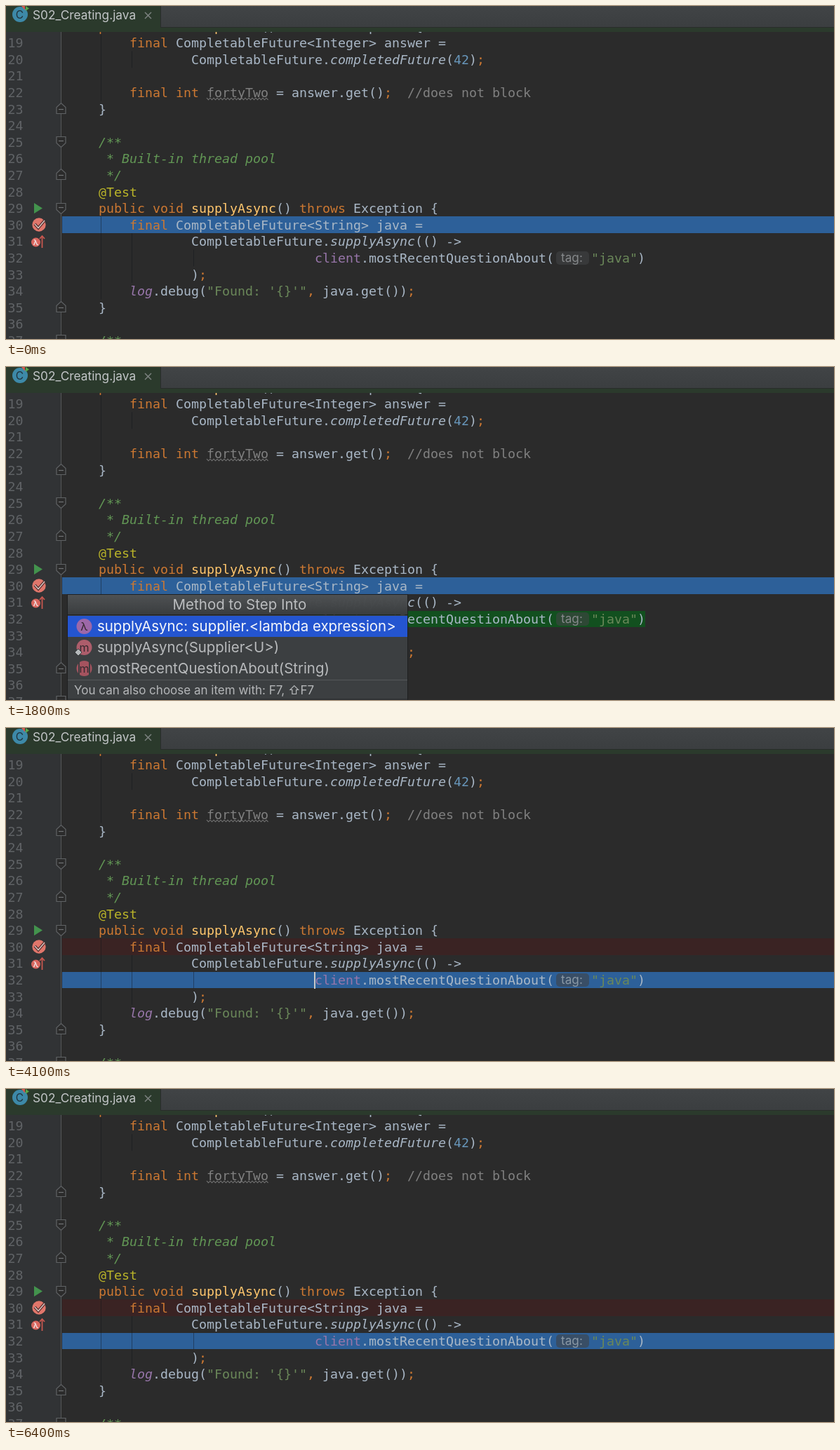
Write an HTML page with a canvas that moves like this. It is 1180x475 px and loops after 6500 ms.

```html
<!DOCTYPE html>
<html lang="en">
<head>
<meta charset="utf-8">
<title>Stepping into a lambda</title>
<style>
html, body { margin: 0; width: 100%; height: 100%; overflow: hidden; background: #2b2b2b; }
canvas { display: block; }
</style>
</head>
<body>
<canvas id="stage" width="1180" height="475"></canvas>
<script>
const ctx = document.getElementById('stage').getContext('2d');
const LOOP = 6500, CHAR = 11, ROW = 23.6, LEFT = 88;
const MONO = '"DejaVu Sans Mono", monospace', SANS = 'Inter, sans-serif';

const plain = '#a9b7c6', key = '#cc7832', method = '#ffc66d', field = '#9876aa',
  str = '#6a8759', doc = '#629755', num = '#6897bb', gray = '#808080', note = '#bbb529';

// row: [first column, ...[color, text, italic]]
const code = {
  18: [4, [key, 'public void '], [method, 'completed'], [plain, '() '], [key, 'throws '], [plain, 'Exception {']],
  19: [8, [key, 'final '], [plain, 'CompletableFuture<Integer> answer =']],
  20: [16, [plain, 'CompletableFuture.'], [plain, 'completedFuture', 1], [plain, '('], [num, '42'], [plain, ')'], [key, ';']],
  22: [8, [key, 'final int '], [gray, 'fortyTwo'], [plain, ' = answer.get()'], [key, ';'], [gray, '  //does not block']],
  23: [4, [plain, '}']],
  25: [4, [doc, '/**', 1]],
  26: [5, [doc, '* Built-in thread pool', 1]],
  27: [5, [doc, '*/', 1]],
  28: [4, [note, '@Test']],
  29: [4, [key, 'public void '], [method, 'supplyAsync'], [plain, '() '], [key, 'throws '], [plain, 'Exception {']],
  30: [8, [key, 'final '], [plain, 'CompletableFuture<String> java =']],
  31: [16, [plain, 'CompletableFuture.'], [plain, 'supplyAsync', 1], [plain, '(() ->']],
  32: [32, [field, 'client'], [plain, '.mostRecentQuestionAbout(']],
  33: [16, [plain, ')'], [key, ';']],
  34: [8, [field, 'log', 1], [plain, '.debug('], [str, '"Found: \'{}\'"'], [key, ','], [plain, ' java.get())'], [key, ';']],
  35: [4, [plain, '}']],
  37: [4, [doc, '/**', 1]]
};

const rowTop = row => 300.4 + (row - 30) * ROW;
const rowMid = row => rowTop(row) + ROW / 2;
const baseline = row => rowMid(row) + 6.6;

function rect(x, y, w, h, fill) {
  ctx.fillStyle = fill;
  ctx.fillRect(x, y, w, h);
}

function disc(x, y, r, fill) {
  ctx.fillStyle = fill;
  ctx.beginPath();
  ctx.arc(x, y, r, 0, 2 * Math.PI);
  ctx.fill();
}

function path(points, stroke, width = 1, fill, close) {
  ctx.beginPath();
  points.forEach(([x, y]) => ctx.lineTo(x, y));
  if (close) ctx.closePath();
  if (fill) { ctx.fillStyle = fill; ctx.fill(); }
  if (stroke) { ctx.strokeStyle = stroke; ctx.lineWidth = width; ctx.stroke(); }
}

function text(s, x, y, size, fill, font = SANS, style = '', align = 'left') {
  ctx.font = `${style} ${size}px ${font}`;
  ctx.textAlign = align;
  ctx.fillStyle = fill;
  ctx.fillText(s, x, y);
}

function vertical(y0, y1, from, to) {
  const g = ctx.createLinearGradient(0, y0, 0, y1);
  g.addColorStop(0, from);
  g.addColorStop(1, to);
  return g;
}

function mono(s, x, row, fill, style) {
  text(s, x, baseline(row), 18.27, fill, MONO, style);
}

function codeLine(row, [col, ...runs]) {
  let x = LEFT + col * CHAR;
  for (const [color, s, italic] of runs) {
    mono(s, x, row, color, italic ? 'italic' : '');
    x += s.length * CHAR;
  }
}

function band(row, fill, x = 80, right = 1180) {
  const y = Math.round(rowTop(row));
  rect(x, y, right - x, Math.round(rowTop(row + 1)) - y, fill);
}

function guide(col, first, last) {
  rect(LEFT + col * CHAR + 3, rowTop(first), 1, (last - first + 1) * ROW, 'rgba(15,20,25,.42)');
}

function fold(row, dir) {
  const y = Math.round(rowMid(row)) - 0.5, x = 78.5;
  const shape = [[-6.5, -7], [6.5, -7], [6.5, 2], [0, 8], [-6.5, 2]];
  path(shape.map(([a, b]) => [x + a, y + b * dir]), '#606365', 1.2, '#2b2b2b', true);
  path([[x - 3.5, y - dir], [x + 3.5, y - dir]], '#707375', 1.2);
}

function gutterIcons() {
  path([[40, 281], [52, 288.5], [40, 296]], null, 0, '#43934d', true);
  disc(47, 312, 9.7, '#e0766b');
  const check = [[41, 311], [46, 316.5], [55, 306]];
  path(check, '#542b2b', 4);
  path(check, '#d8c4c0', 1.5);
  disc(42.5, 337, 6.5, '#d9665e');
  text('λ', 42.5, 341, 11, '#f0dddd', SANS, 'bold', 'center');
  path([[51.5, 345], [51.5, 329]], '#c9574f', 1.8);
  path([[48, 332], [51.5, 328], [55, 332]], '#c9574f', 1.8);
}

function editor(scene) {
  rect(0, 0, 1180, 475, '#2b2b2b');
  rect(0, 37, 79, 438, '#313335');
  rect(78, 37, 1, 438, '#555759');

  band(30, '#3a2323');
  if (scene.execRow) band(scene.execRow, '#2d6099');
  if (scene.popup) band(32, '#12501f', 440, 911);

  guide(4, 18, 22);
  guide(8, 20, 20);
  guide(4, 30, 34);
  guide(8, 31, 33);
  guide(16, 32, 32);

  for (let row = 19; row <= 37; row++) mono(row, 2.5, row, '#606366');
  for (const row in code) codeLine(+row, code[row]);

  ctx.fillStyle = 'rgba(65,67,69,.6)';
  ctx.beginPath();
  ctx.roundRect(784, 350, 47, 19, 5);
  ctx.fill();
  text('tag:', 791, 365, 17.2, scene.execRow === 32 ? '#8998a5' : '#85888a');
  mono('"java"', 834, 32, str);
  mono(')', 900, 32, plain);

  const wave = [];
  for (let x = 286; x <= 374; x += 2.5) wave.push([x, 132.5 + (wave.length % 2 ? 1.3 : -1.3)]);
  path(wave, '#777', 1.1);

  [18, 25, 29, 37].forEach(row => fold(row, 1));
  [23, 27, 35].forEach(row => fold(row, -1));
  gutterIcons();

  if (scene.caret) {
    const [row, col] = scene.caret;
    rect(LEFT + col * CHAR - 1, Math.round(rowTop(row)), 2, 24, '#c8c8c8');
  }
}

function tabBar() {
  rect(0, 0, 1180, 30, vertical(0, 30, '#414446', '#3b3e40'));
  rect(0, 0, 220, 37, '#2b3a2c');
  rect(220, 0, 1, 30, '#292c2c');
  rect(220, 30, 960, 7, '#2b3a2c');
  rect(220, 30, 960, 1, '#292d2b');
  disc(20, 12, 11, '#3d89a8');
  text('C', 19.5, 18, 15.5, '#21333c', SANS, '', 'center');
  path([[22, 0], [27, 0], [27, 6]], null, 0, '#d25b4f', true);
  path([[28, 0], [33, 3.5], [28, 7]], null, 0, '#57a64a', true);
  text('S02_Creating.java', 38, 19, 17.3, '#c3c6c8');
  path([[198, 9], [207, 18]], '#7d8280', 1.5);
  path([[207, 9], [198, 18]], '#7d8280', 1.5);
}

function stepMenu() {
  const x = 88, w = 484;
  rect(x - 1, 324, w + 2, 151, 'rgba(28,29,30,.8)');
  rect(x, 325, w, 28, vertical(325, 353, 'rgba(82,85,87,.93)', 'rgba(60,63,65,.93)'));
  rect(x, 354, w, 121, '#3c3f41');
  rect(x, 355, w, 30, '#2455d0');
  rect(x, 446, w, 1, '#55585a');
  rect(x, 473, w, 2, '#303234');
  text('Method to Step Into', 333, 346, 20.5, '#bbbdbf', SANS, '', 'center');

  const items = [
    ['λ', '#9d68a8', 'supplyAsync: supplier.<lambda expression>', '#f4f6fa'],
    ['m', '#ad5d6b', 'supplyAsync(Supplier<U>)', '#b8babc'],
    ['m', '#a5535f', 'mostRecentQuestionAbout(String)', '#b8babc']
  ];
  items.forEach(([glyph, color, label, ink], i) => {
    const y = 370 + 30 * i;
    disc(111.5, y, 11, color);
    text(glyph, 111.5, y + 5.5, 16, '#34282e', SANS, '', 'center');
    text(label, 130, y + 7, 20.45, ink);
  });
  path([[103, 402], [108, 407], [103, 412], [98, 407]], '#3c3f41', 1, '#b4b8ba', true);
  rect(103, 419, 2, 22, '#3c3f41');
  rect(118, 419, 2, 22, '#3c3f41');
  text('You can also choose an item with: F7, ⇧F7', 97, 467, 17, '#b4b6b8');
}

function sceneAt(t) {
  if (t < 1800) return { execRow: 30, caret: t >= 700 && t < 1500 && [30, 14] };
  if (t < 3200) return { execRow: 30, popup: true };
  if (t < 4100) return { caret: (t < 3600 || t >= 4000) && [30, 14] };
  const visible = t < 4800 || Math.floor((t - 4800) / 400) % 2 === 1;
  return { execRow: 32, caret: visible && [32, 32] };
}

function draw(time) {
  const scene = sceneAt(time % LOOP);
  editor(scene);
  tabBar();
  if (scene.popup) stepMenu();
}

const began = performance.now();
function tick() {
  draw(performance.now() - began);
  requestAnimationFrame(tick);
}
tick();
</script>
</body>
</html>
```
